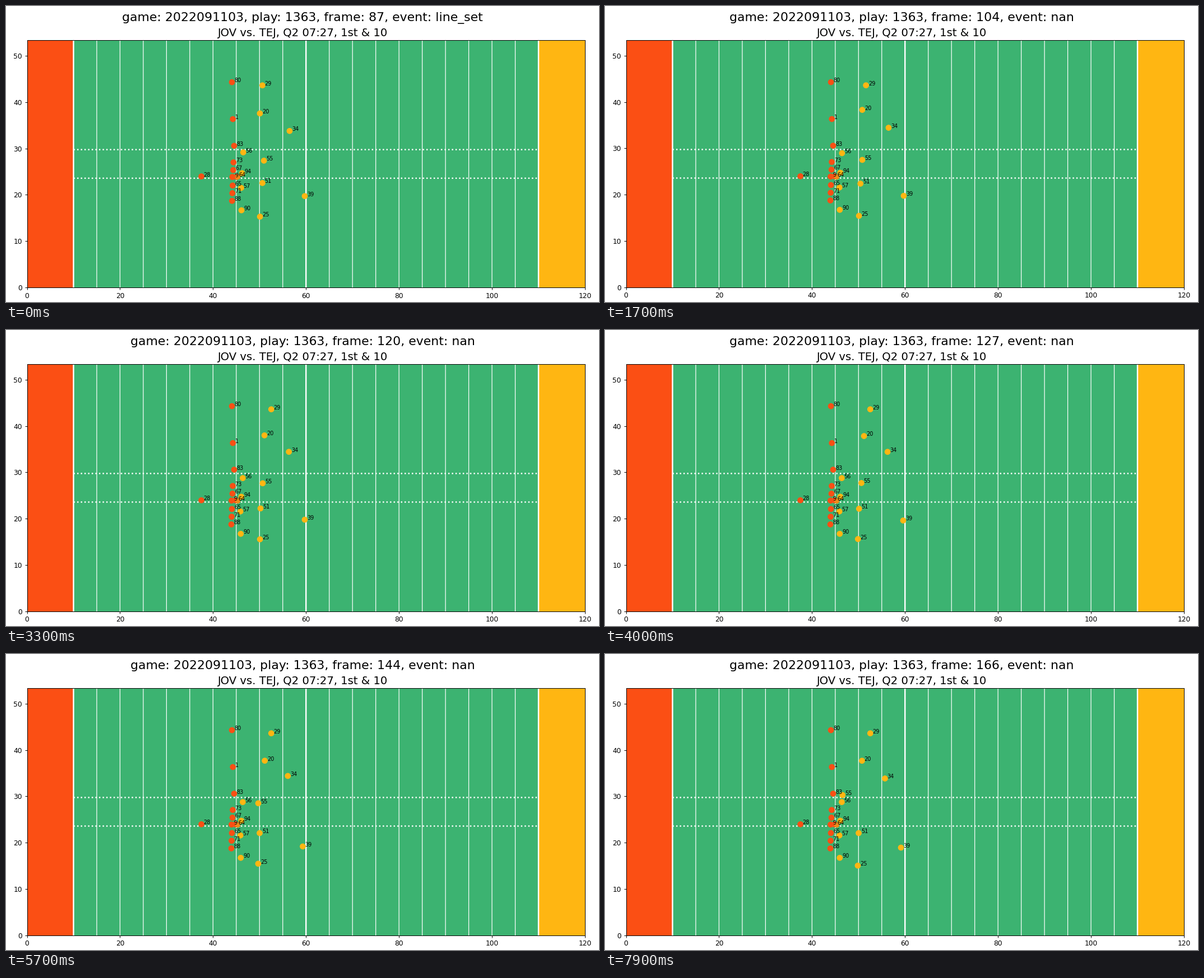
Recreate the animation shown at these times as a matplotlib script. Size 1058 px wide and 529 px high, loop 8 s.

```python
import numpy as np
import matplotlib.pyplot as plt
from matplotlib.animation import FuncAnimation

W, H = 1058, 529
FRAMES, INTERVAL = 80, 100
FIRST_NUMBER = 87
LEFT, RIGHT, TOP = 37.5, 1033.0, 61.4

ORANGE, YELLOW = "#FB4F14", "#FFB612"
GREEN, BALL = "#3CB371", "#EE8C1C"

plt.rcParams["font.family"] = "DejaVu Sans"

# Offensive line: evenly spaced and slightly slanted, the snapper ahead of it.
line = ["73", "67", "64", "65", "71", "88"]
offense = {tag: (44.4 - 0.06 * i, 27.0 - 1.66 * i) for i, tag in enumerate(line)}
offense.update({"64": (45.05, 23.88), "9": (44.15, 23.85), "28": (37.5, 23.97),
                "80": (44.07, 44.28), "1": (44.27, 36.32), "83": (44.54, 30.57)})

defense = {"29": (50.63, 43.6), "20": (50.08, 37.55), "34": (56.47, 33.77),
           "56": (46.5, 29.16), "55": (50.95, 27.37), "94": (46.25, 24.67),
           "51": (50.63, 22.55), "57": (46.05, 21.5), "39": (59.73, 19.73),
           "90": (46.12, 16.67), "25": (50.1, 15.3)}

# Walks: (step, yards along, yards across) relative to the starting spot.
walks = {
    "29": [(33, 1.9, 0)],
    "20": [(17, 0.72, 0.75), (47, 1.22, 0.14), (79, 0.67, 0.13)],
    "34": [(17, 0, 0.67), (67, -0.48, 0.62), (79, -0.78, 0.08)],
    "56": [(33, -0.1, -0.4)],
    "55": [(47, -0.38, 0.38), (67, -2.05, 1.88), (79, -4.39, 2.9)],
    "51": [(47, -0.6, -0.48)],
    "39": [(33, 0, 0.05), (67, -0.6, -0.8)],
    "25": [(33, 0, 0.25), (47, -0.44, 0.35), (79, -0.26, -0.25)],
}


def place(tag, spot, t):
    x, y = spot
    if tag in walks:
        steps, dx, dy = np.array([(0, 0, 0), *walks[tag]]).T
        return x + np.interp(t, steps, dx), y + np.interp(t, steps, dy)
    if 40 < x < 47 and y < 28:
        # Both fronts settle back a little while getting set.
        settle = 1 - np.exp(-t / 6)
        return x - 0.16 * settle, y + 0.06 * settle
    return x, y


players = {**offense, **defense}
colors = [ORANGE] * len(offense) + [YELLOW] * len(defense)


def spots_at(t):
    return np.array([place(tag, spot, t) for tag, spot in players.items()])


fig = plt.figure(figsize=(12, 6), dpi=W / 12, facecolor="white")
ax = fig.add_axes([0, 0, 1, 1], facecolor=GREEN)
ax.set_xlim(0, 120)
ax.set_ylim(0, 53.3)
ax.set_xticks(range(0, 121, 20))
ax.set_yticks(range(0, 51, 10))
ax.tick_params(labelsize=10)
heading = fig.suptitle("", fontsize=18)
fig.text(0.5, 1 - 53.8 / H, "JOV vs. TEJ, Q2 07:27, 1st & 10", fontsize=16, ha="center")

ax.axvspan(0, 10, color=ORANGE)
ax.axvspan(110, 120, color=YELLOW)
for yard in range(10, 111, 5):
    ax.axvline(yard, color="white", lw=2 if yard in (10, 60, 110) else 1, snap=False)
for hash_y in (23.583, 29.75):
    ax.plot([10, 110], [hash_y, hash_y], ":", color="white", lw=2, snap=False)

dots = ax.scatter(*spots_at(0).T, s=60, c=colors, zorder=3)
ax.scatter([45.25], [23.93], s=45, c=BALL, zorder=3)
labels = [ax.text(0, 0, tag, fontsize=8, zorder=4) for tag in players]


def set_axes(bottom):
    ax.set_position([LEFT / W, 1 - bottom / H, (RIGHT - LEFT) / W, (bottom - TOP) / H])


def draw(i):
    event = "nan" if i else "line_set"
    heading.set_text(f"game: 2022091103, play: 1363, "
                     f"frame: {FIRST_NUMBER + i}, event: {event}")
    set_axes(502.8 if i else 503.3)
    spots = spots_at(i)
    dots.set_offsets(spots)
    for label, (x, y) in zip(labels, spots):
        label.set_position((x + 0.5, y))
    return [heading, dots, *labels]


anim = FuncAnimation(fig, draw, frames=FRAMES, interval=INTERVAL,
                     repeat=True, repeat_delay=0, blit=False)
plt.show()
```
